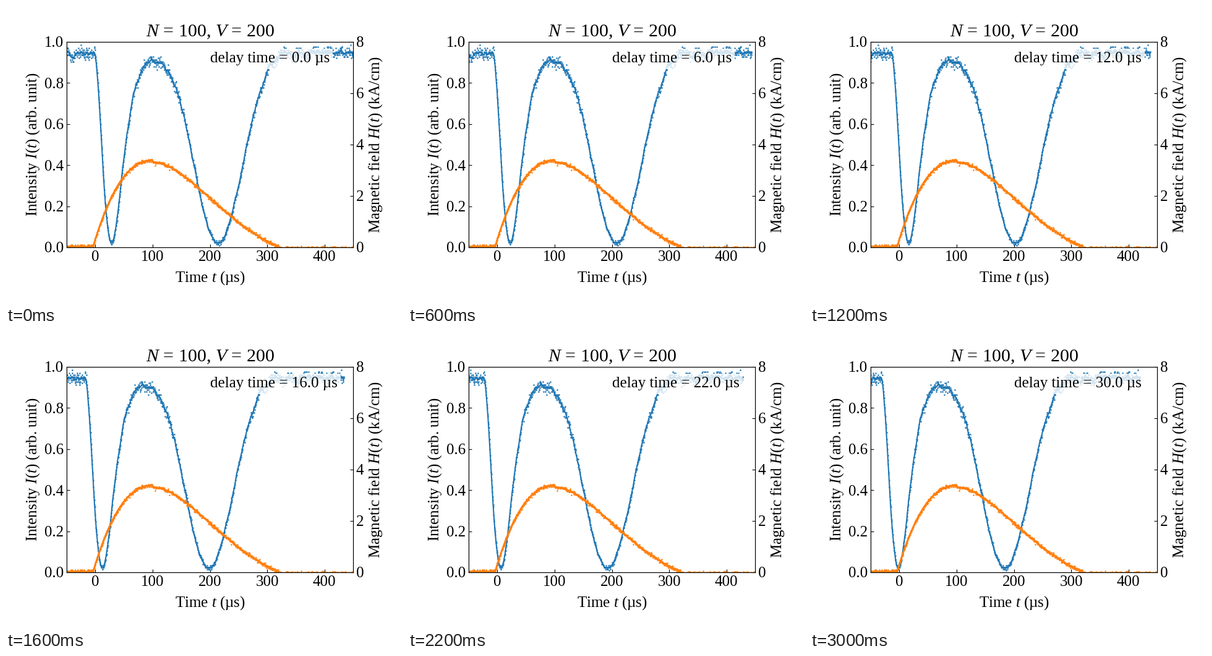
Write a matplotlib script that moves like this. It is 640 px wide and 480 px high and loops after 3100 ms.

```python
import numpy as np
import matplotlib.pyplot as plt
from matplotlib.animation import FuncAnimation

plt.rcParams.update({
    "font.family": "Liberation Serif",
    "font.size": 18,
    "mathtext.fontset": "custom",
    "mathtext.rm": "Liberation Serif",
    "mathtext.it": "Liberation Serif:italic",
    "xtick.direction": "in",
    "ytick.direction": "in",
})

WIDTH, HEIGHT, DPI = 640, 480, 100
FRAMES, INTERVAL = 31, 100
DELAY_STEP = 1.0  # us per frame
BLUE, ORANGE = "tab:blue", "tab:orange"


def pulse(t, start, half_period, decay):
    """One half-wave of a damped sine, zero before and after it."""
    s = np.clip(t - start, 0, half_period)
    return np.sin(np.pi * s / half_period) * np.exp(-s / decay)


def running_mean(y, width):
    pad = np.pad(y, width // 2, mode="edge")
    return np.convolve(pad, np.ones(width) / width, mode="valid")


def quantise(y, step):
    return np.round(y / step) * step


rng = np.random.default_rng(7)
time = np.arange(-50, 450.1, 0.5)


def noise():
    return rng.normal(0, 1, time.size)


# Light through crossed polarisers follows the squared cosine of the rotation
angle = 2.192 * np.pi * pulse(time, -2, 337, 157)
light = 0.022 + 0.923 * np.cos(angle) ** 2
drift = 0.02 * running_mean(noise(), 15)
intensity = quantise(light + (0.3 + 0.7 * light) * (0.014 * noise() + drift), 0.008)
intensity_line = running_mean(intensity, 9)

shape = pulse(time, -4, 330, 153.6)
field_line = 3.35 * shape / shape.max() + np.where(time < 100, 0.03, -0.03)
field = quantise(field_line + 0.035 * noise(), 0.03)

fig = plt.figure(figsize=(WIDTH / DPI, HEIGHT / DPI), dpi=DPI)
left, bottom, right, top = 98.2, 90, 561, 422.2
ax = fig.add_axes([left / WIDTH, bottom / HEIGHT,
                   (right - left) / WIDTH, (top - bottom) / HEIGHT])
ax2 = ax.twinx()

dots = dict(ls="", marker=".", ms=2, mew=0.8)
blue_dots, = ax.plot(time, intensity, color=BLUE, **dots)
blue_line, = ax.plot(time, intensity_line, color=BLUE, lw=1.5)
ax2.plot(time, field, color=ORANGE, **dots)
ax2.plot(time, field_line, color=ORANGE, lw=2)

ax.set(xlim=(-50, 450), ylim=(0, 1), xticks=range(0, 401, 100))
ax2.set(ylim=(0, 8), yticks=range(0, 9, 2))
ax.set_title("$N$ = 100, $V$ = 200")
ax.set_xlabel("Time $t$ (µs)", labelpad=7)
ax.set_ylabel("Intensity $I(t)$ (arb. unit)", labelpad=4)
ax2.set_ylabel("Magnetic field $H(t)$ (kA/cm)", labelpad=4)

label = ax.text(200, 0.9, "",
                bbox=dict(facecolor="white", edgecolor="none", alpha=0.8))


def update(frame):
    delay = frame * DELAY_STEP
    blue_dots.set_xdata(time - delay)
    blue_line.set_xdata(time - delay)
    label.set_text(f"delay time = {delay:.1f} µs")
    return blue_dots, blue_line, label


anim = FuncAnimation(fig, update, frames=FRAMES, interval=INTERVAL,
                     repeat=True, repeat_delay=0)
plt.show()
```
